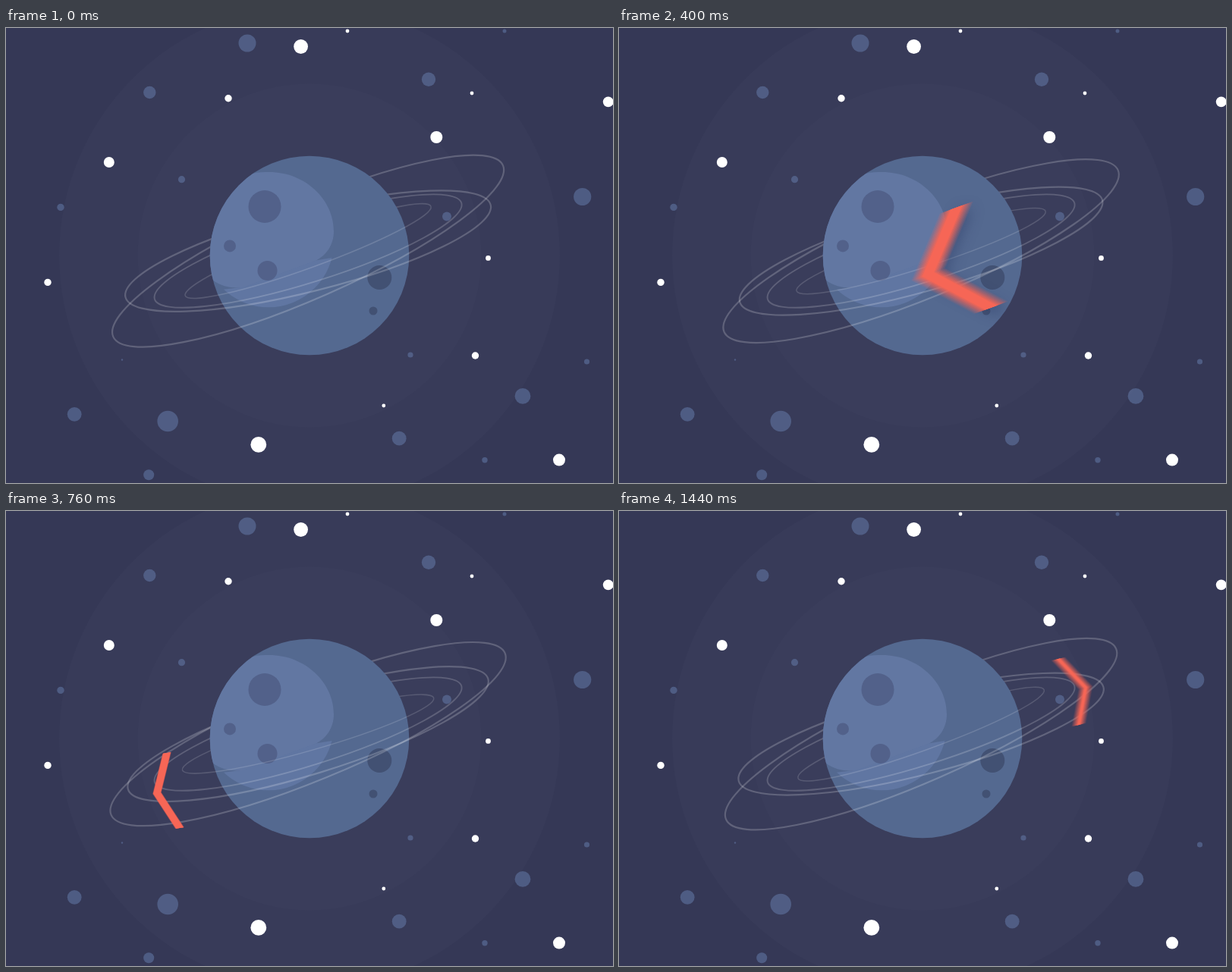
These frames come from a looping animation (800x600 px, 1.48 s). An HTML page with a canvas:

```html
<!DOCTYPE html>
<html lang="en">
<head>
<meta charset="utf-8">
<title>Orbit</title>
<style>
html, body { margin: 0; width: 100%; height: 100%; overflow: hidden; background: #353856; }
canvas { display: block; width: 800px; height: 600px; }
</style>
</head>
<body>
<canvas id="stage" width="800" height="600"></canvas>
<script>
const ctx = document.getElementById('stage').getContext('2d');
const LOOP = 1480, STEP = 40, TAU = Math.PI * 2;

// x, y, radius
const blueStars = [
  [318, 20, 11.5], [189.3, 85, 8.2], [557, 67.7, 9.2], [657, 4, 2.5], [231.5, 199.7, 4.6],
  [72, 236.4, 4.7], [759.7, 222.5, 11.6], [581, 248.5, 6], [90.2, 509.3, 9.4], [213.2, 518.5, 13.8],
  [188.2, 589.2, 7], [518.2, 541.2, 9.4], [533, 431, 3.6], [631, 569.8, 3.7], [681, 485.4, 10.4],
  [765.5, 440, 3.6], [153, 437.5, 1.2]
];
const whiteStars = [
  [388.6, 24.5, 9.4], [450, 4, 2.4], [293, 92.8, 4.7], [135.8, 177, 7], [567.3, 144, 8],
  [614, 86, 2.4], [793.7, 97.3, 6.9], [55, 335.4, 4.7], [635.5, 303.4, 3.4], [618.5, 432, 4.7],
  [497.8, 498, 2.4], [332.8, 549.4, 10.4], [729, 569.6, 8]
];

// half axes, tilt at rest, tilt change, moment of the turn, line width, opacity
const rings = [
  { a: 280.6, b: 62.1, tilt: 23.75, swing: -1.9, peak: 0.35, width: 2.2, alpha: 0.2 },
  { a: 248.2, b: 53.1, tilt: 14.2, swing: 3.4, peak: 0.6, width: 2.2, alpha: 0.2 },
  { a: 211.9, b: 41.2, tilt: 17.44, swing: 0, peak: 0.5, width: 1.9, alpha: 0.18 },
  { a: 172.3, b: 21.9, tilt: 20, swing: -4.1, peak: 0.5, width: 1.5, alpha: 0.15 }
];

// time, upper end, tip, lower end, blur length
const poses = [
  [0, 606, 188, 617, 237, 628, 286, 3],
  [160, 581, 190, 580, 249.5, 627, 288, 5],
  [320, 498, 217, 469, 304, 548, 343, 18],
  [520, 361, 268, 320, 349, 397, 400, 12],
  [760, 212, 319, 199, 372, 229, 418, 1.5],
  [860, 186, 330, 193, 373, 200, 416, 2],
  [1120, 375, 265, 432, 290, 400, 345, 10],
  [1440, 579, 195, 615, 233, 606, 282, 9]
];

function poseAt(t) {
  const n = poses.length;
  const key = i => {
    const turn = Math.floor(i / n), p = poses[i - turn * n];
    return [p[0] + turn * LOOP, ...p.slice(1)];
  };
  let i = n - 1;
  while (poses[i][0] > t) i--;
  const [p, a, b, q] = [key(i - 1), key(i), key(i + 1), key(i + 2)];
  const span = b[0] - a[0], u = (t - a[0]) / span, u2 = u * u, u3 = u2 * u;
  return a.slice(1).map((v, k) => {
    const w = b[k + 1];
    const m0 = (w - p[k + 1]) / (b[0] - p[0]) * span;
    const m1 = (q[k + 1] - v) / (q[0] - a[0]) * span;
    return (2 * u3 - 3 * u2 + 1) * v + (u3 - 2 * u2 + u) * m0 + (3 * u2 - 2 * u3) * w + (u3 - u2) * m1;
  });
}

function disc(x, y, r, fill) {
  ctx.fillStyle = fill;
  ctx.beginPath();
  ctx.arc(x, y, r, 0, TAU);
  ctx.fill();
}

function clipPlanet() {
  ctx.beginPath();
  ctx.arc(400, 300, 131.3, 0, TAU);
  ctx.clip();
}

function drawRings(t, front) {
  for (const r of rings) {
    const u = t / LOOP;
    const k = u < r.peak ? u / r.peak : (1 - u) / (1 - r.peak);
    const angle = -(r.tilt + r.swing * k) * Math.PI / 180;
    ctx.strokeStyle = `rgba(255,255,255,${r.alpha})`;
    ctx.lineWidth = r.width;
    ctx.beginPath();
    ctx.ellipse(398.1, 294.1, r.a, r.b, angle, front ? 0 : Math.PI, front ? Math.PI : TAU);
    ctx.stroke();
  }
}

function drawPlanet() {
  disc(400, 300, 131.3, '#546990');
  ctx.save();
  clipPlanet();
  ctx.fillStyle = '#6277a2';
  ctx.fill(new Path2D('M325 192C332 190 340 190 347 190C394 190 432 226 432 268' +
    'C432 286 422 300 408 307L313 342C300 343.500 285 342 272 332L250 300V190Z'));
  ctx.save();
  ctx.clip(new Path2D('M270 346L285 345L313 341.500L408 306.500L429.500 303L450 303V380H270Z'));
  disc(346, 282.3, 86, '#6076a2');
  ctx.restore();
  ctx.restore();
  disc(341, 235.5, 21.5, '#52618a');
  disc(295, 287.4, 8, '#52618a');
  disc(344.5, 320, 13, '#52618a');
  disc(492.3, 329, 16, '#425173');
  disc(484, 373, 5.5, '#425173');
}

function bandPath([ux, uy, tx, ty, lx, ly], dx, dy) {
  ctx.beginPath();
  ctx.moveTo(ux - dx, uy - dy);
  ctx.lineTo(tx - dx, ty - dy);
  ctx.lineTo(lx - dx, ly - dy);
  ctx.lineTo(lx + dx, ly + dy);
  ctx.lineTo(tx + dx, ty + dy);
  ctx.lineTo(ux + dx, uy + dy);
  ctx.closePath();
}

function drawChevron(p, front) {
  const dx = p[2] - (p[0] + p[4]) / 2, dy = p[3] - (p[1] + p[5]) / 2;
  const len = Math.hypot(dx, dy);
  if (len < 0.5) return;
  const ex = dx / len, ey = dy / len, half = len / 4;
  const soft = Math.min(p[6] / 2, half * 0.9);

  if (front) {
    ctx.save();
    clipPlanet();
    ctx.shadowColor = 'rgba(42,56,98,0.65)';
    ctx.shadowBlur = 18;
    ctx.shadowOffsetX = 12;
    ctx.shadowOffsetY = 4;
    ctx.fillStyle = '#f66656';
    bandPath(p, ex * (half - soft), ey * (half - soft));
    ctx.fill();
    ctx.restore();
  }

  // nested bands build a linear ramp along the direction of travel
  const layers = 10;
  ctx.save();
  ctx.fillStyle = '#f66656';
  for (let i = 1; i <= layers; i++) {
    const w = half + soft * (1 - 2 * (i - 0.5) / layers);
    ctx.globalAlpha = 1 / (layers - i + 1);
    bandPath(p, ex * w, ey * w);
    ctx.fill();
  }
  ctx.restore();
}

function draw(t) {
  ctx.fillStyle = '#353856';
  ctx.fillRect(0, 0, 800, 600);
  disc(400, 300, 330, '#383b59');
  disc(400, 300, 226.5, '#3a3d5b');
  for (const s of whiteStars) disc(...s, '#fff');

  const pose = poseAt(t), front = t < 860;
  drawRings(t, false);
  if (!front) {
    drawRings(t, true);
    drawChevron(pose, false);
    drawPlanet();
    ctx.save();
    clipPlanet();
    drawRings(t, true);
    ctx.restore();
  } else {
    drawPlanet();
    drawRings(t, true);
    drawChevron(pose, true);
  }
  for (const s of blueStars) disc(...s, 'rgba(103,128,176,0.5)');
}

const start = performance.now();
function tick() {
  const t = (performance.now() - start) % LOOP;
  draw(Math.floor(t / STEP) * STEP);
  requestAnimationFrame(tick);
}
tick();
</script>
</body>
</html>
```
